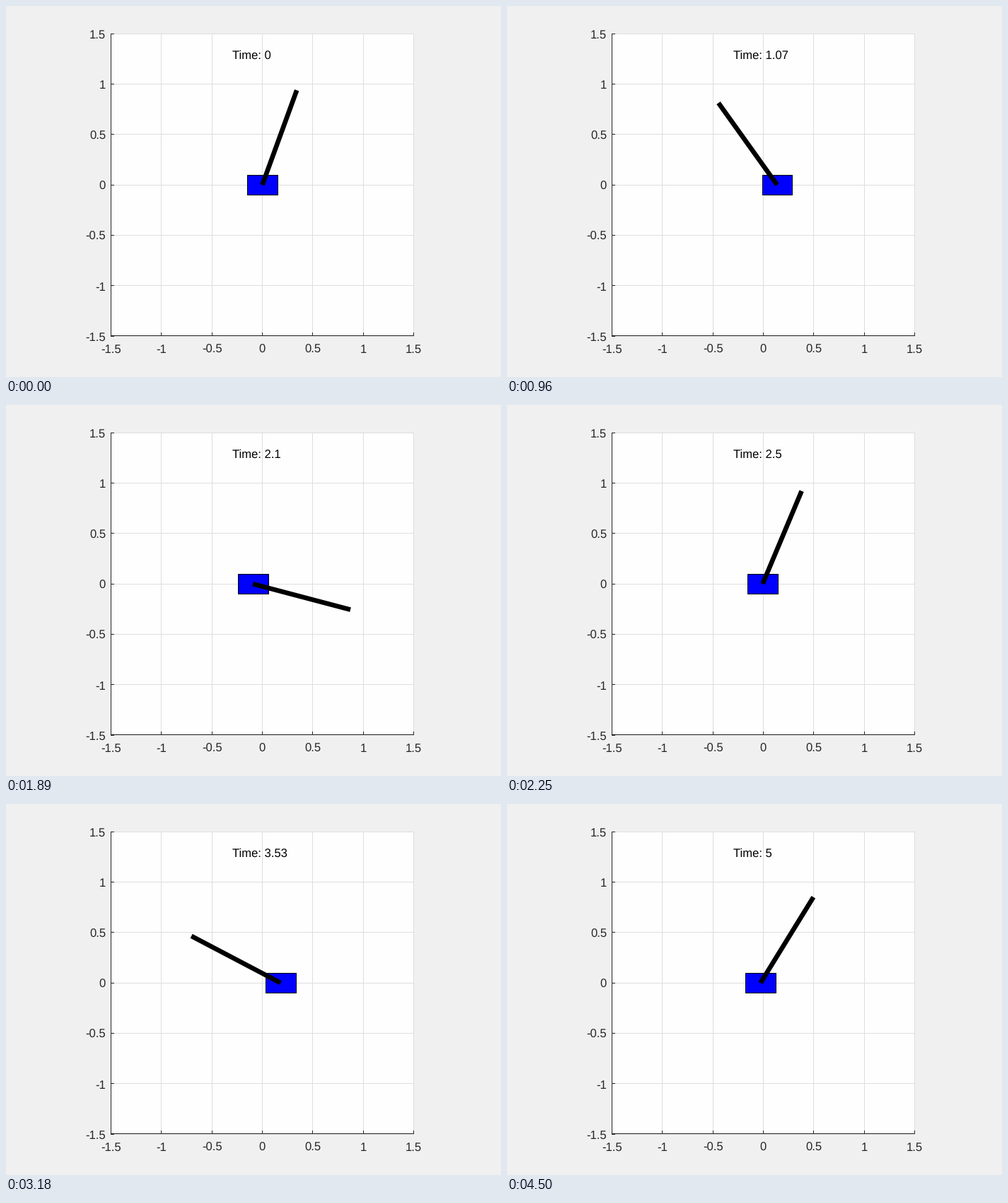
A matplotlib script for the animation above (4530 ms loop, 700 by 525 pixels).

```python
import numpy as np
import matplotlib.pyplot as plt
from matplotlib.animation import FuncAnimation
from matplotlib.patches import Rectangle

plt.rcParams["font.family"] = "Liberation Sans"
plt.rcParams["font.size"] = 12
plt.rcParams["text.hinting"] = "none"

W, H, DPI = 700, 525, 100
FRAMES, STEP_MS = 151, 30
DT = 1 / 30               # simulated seconds per frame
UNIT = 142.6              # pixels per axis unit
OX, OY = 362.4, 253.2     # pixel position of the axis origin
GRAVITY, LENGTH, MASS_RATIO = 9.81, 0.5, 0.297
START = np.radians(20)
K = MASS_RATIO * LENGTH


def px(points):
    """Convert a size in pixels to points."""
    return points * 72 / DPI


def crisp(v):
    """Centre of the pixel nearest to v."""
    return round(v) + 0.5


def slope(state):
    """Free pole on a frictionless cart; the angle is from upright."""
    angle, speed = state
    s, c = np.sin(angle), np.cos(angle)
    return np.array([speed, (GRAVITY * s - K * speed**2 * s * c)
                     / (LENGTH - K * c**2)])


def simulate(substeps=20):
    h = DT / substeps
    state = np.array([START, 0.0])
    angles = [START]
    for _ in range(FRAMES - 1):
        for _ in range(substeps):
            a = slope(state)
            b = slope(state + h / 2 * a)
            c = slope(state + h / 2 * b)
            d = slope(state + h * c)
            state = state + h / 6 * (a + 2 * b + 2 * c + d)
        angles.append(state[0])
    return np.array(angles)


angles = simulate()
cart_x = K * (np.sin(START) - np.sin(angles))   # centre of mass stays put

fig = plt.figure(figsize=(W / DPI, H / DPI), dpi=DPI, facecolor="#f0f0f0")
ax = fig.add_axes([0, 0, 1, 1])
ax.set(xlim=(0, W), ylim=(H, 0))
ax.axis("off")

LEFT, RIGHT, TOP, BOTTOM = 148.5, 576.5, 39.5, 466.5
INK, GRID = "#262626", "#dedede"


def line(x, y, color):
    ax.plot(x, y, color=color, lw=px(1), solid_capstyle="projecting",
            snap=False, zorder=2)


ax.add_patch(Rectangle((148, 39), 429, 428, fc="#fefefe", ec="none", zorder=0))

ticks = np.arange(-3, 4) / 2
cols = [crisp(362 + UNIT * v) for v in ticks]
rows = [crisp(252.65 - UNIT * v) for v in ticks]
for x in cols:
    line([x, x], [TOP, BOTTOM], GRID)
for y in rows:
    line([LEFT, RIGHT], [y, y], GRID)

line([LEFT, LEFT], [TOP, BOTTOM], INK)
line([LEFT, RIGHT], [BOTTOM, BOTTOM], INK)
for v, x, y in zip(ticks, cols, rows):
    line([x, x], [BOTTOM - 4, BOTTOM], INK)
    line([LEFT, LEFT + 4], [y, y], INK)
    label = f"{v:g}"
    ax.text(OX + UNIT * v, 491, label, color=INK, ha="center", va="baseline")
    ax.text(141, OY - UNIT * v + 6.8, label, color=INK,
            ha="right", va="baseline")

HALF_W, HALF_H = 0.15 * UNIT, 0.1 * UNIT
cart_top, cart_bottom = crisp(OY - HALF_H), crisp(OY + HALF_H)
cart = Rectangle((0, cart_top), 0, cart_bottom - cart_top, fc="#0000ff",
                 ec="black", lw=px(1), snap=False, zorder=3)
ax.add_patch(cart)
pole, = ax.plot([], [], color="black", lw=px(6.67),
                solid_capstyle="butt", zorder=4)
clock = ax.text(320, 75, "", color="black", va="baseline", zorder=5)


def draw(i):
    x = OX + UNIT * cart_x[i]
    left, right = crisp(x - HALF_W), crisp(x + HALF_W)
    cart.set_x(left)
    cart.set_width(right - left)
    pole.set_data([x, x + UNIT * np.sin(angles[i])],
                  [OY, OY - UNIT * np.cos(angles[i])])
    clock.set_text(f"Time: {i * DT:.3g}")
    return cart, pole, clock


anim = FuncAnimation(fig, draw, frames=FRAMES, interval=STEP_MS,
                     repeat=True, repeat_delay=0)
plt.show()
```
